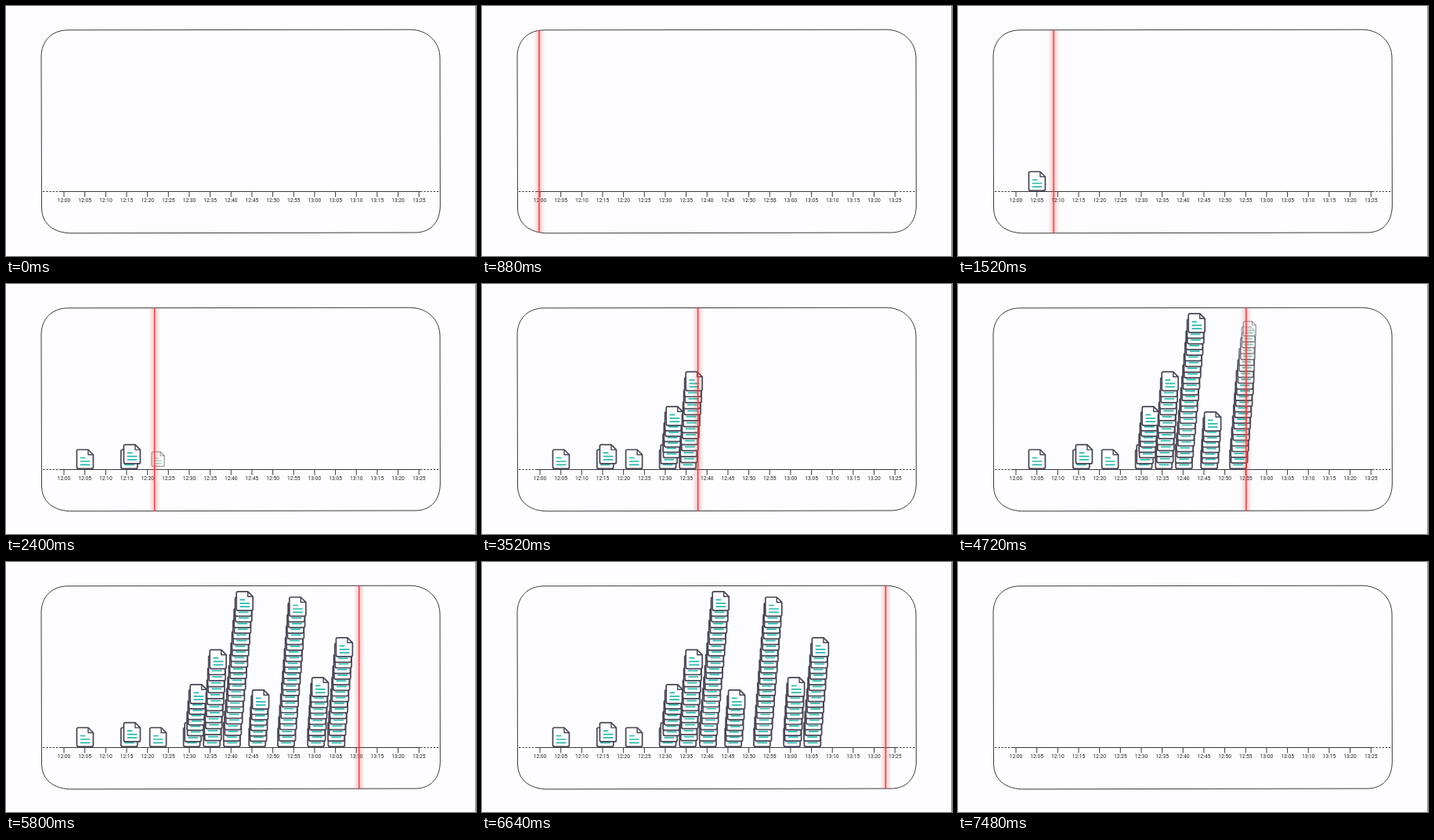
An HTML page with a canvas that plays this animation: 600 px wide and 320 px high, repeating every 7.88 s.

```html
<!DOCTYPE html>
<html lang="en">
<head>
<meta charset="utf-8">
<title>Documents over time</title>
<style>
  html, body { margin: 0; width: 600px; height: 320px; overflow: hidden; background: #fdfcfe; }
  svg, canvas { position: absolute; left: 0; top: 0; display: block; }
  text { font: 6.7px Roboto, Arial, sans-serif; text-anchor: middle; fill: #222; }
</style>
</head>
<body>
<svg width="600" height="320" viewBox="0 0 600 320" fill="none" stroke="#3a3a3e">
  <path id="frame"/>
  <path d="M68 237.5H529"/>
  <path d="M47 237.5H68M529 237.5H554" stroke-dasharray="2.4 1.8"/>
  <path d="M599.5 0V320" stroke="#85858a"/>
  <g id="ticks"></g>
</svg>
<canvas id="stage" width="600" height="320"></canvas>
<script>
const LOOP = 7880, STEP = 40;
const SWEEP_START = 520, SPEED = 0.0768, LEFT = 45.3;
const POP = 150, FADE_START = 7180, FADE_END = 7480;
const BASE = 212, GAP = 7.4, DOC_W = 21, DOC_H = 24.3;

const FRAME = 'M79 30.8L515 30.2C538 30 554 46 554 67L554.3 255' +
  'C554.3 277 542 290 522 290L85 290.8C61 291 45.5 279 45.5 258L45 65C45 45 58 31 79 30.8Z';
const framePath = new Path2D(FRAME);
document.getElementById('frame').setAttribute('d', FRAME);

const NS = 'http://www.w3.org/2000/svg';
const ticks = document.getElementById('ticks');
function add(tag, attrs, label) {
  const el = document.createElementNS(NS, tag);
  for (const key in attrs) el.setAttribute(key, attrs[key]);
  if (label) el.textContent = label;
  ticks.appendChild(el);
}
for (let i = 0; i < 18; i++) {
  const x = 74 + i * 26.66;
  const minutes = i * 5;
  const label = (12 + Math.floor(minutes / 60)) + ':' + String(minutes % 60).padStart(2, '0');
  add('path', { d: `M${x} 237.5V244.5` });
  add('text', { x, y: 250.9, stroke: 'none' }, label);
}

// Each pile: bottom x, top x, top y, optional bottom y
const piles = [
  [90.4, 90.4, BASE],
  [147.8, 150.4, 205.6],
  [183.6, 183.6, BASE],
  [227.6, 228.2, 205.6],
  [231.5, 235.2, 156.8, 198],
  [253.2, 260.2, 112.3],
  [278, 294.2, 37.8],
  [311.2, 314.6, 163.8],
  [348, 361.8, 45],
  [386.2, 390.6, 147.8],
  [411.4, 421.4, 96.8]
];

const docs = piles.flatMap(([x0, x1, top, bottom = BASE]) => {
  const last = Math.round((bottom - top) / GAP);
  return Array.from({ length: last + 1 }, (_, i) => {
    const k = last ? i / last : 0;
    const x = x0 + (x1 - x0) * k;
    return {
      x: x - (last - i) % 2,
      y: bottom + (top - bottom) * k,
      start: SWEEP_START + (x - LEFT) / SPEED
    };
  });
});

const outline = new Path2D(
  'M2 0H14.5L21 6.5V22.3Q21 24.3 19 24.3H2Q0 24.3 0 22.3V2Q0 0 2 0Z');
const fold = new Path2D('M14.5 0V6.5H21');
const lines = new Path2D('M4.3 10.5H11M4.3 15H17M4.3 19.3H17');

const ctx = document.getElementById('stage').getContext('2d');
const layer = document.createElement('canvas');
layer.width = 600;
layer.height = 320;
const pen = layer.getContext('2d');

function drawDoc(doc, t) {
  const p = Math.min(1, (t - doc.start) / POP);
  if (p <= 0) return;
  const s = 0.5 + 0.5 * p;
  pen.save();
  pen.globalAlpha = p;
  pen.translate(doc.x + DOC_W / 2, doc.y + DOC_H / 2);
  pen.scale(s, s);
  pen.translate(-DOC_W / 2, -DOC_H / 2);
  pen.lineJoin = 'round';
  pen.fillStyle = '#fdfdfe';
  pen.fill(outline);
  pen.strokeStyle = '#464655';
  pen.lineWidth = 1.7;
  pen.stroke(outline);
  pen.lineWidth = 1.4;
  pen.stroke(fold);
  pen.strokeStyle = '#2bb9ad';
  pen.lineWidth = 1.7;
  pen.stroke(lines);
  pen.restore();
}

function drawSweep(t) {
  const x = LEFT + (t - SWEEP_START) * SPEED;
  if (t < SWEEP_START || x > 562) return;
  const glow = ctx.createLinearGradient(x - 7.5, 0, x + 7.5, 0);
  glow.addColorStop(0, 'rgba(240,70,70,0)');
  glow.addColorStop(0.3, 'rgba(240,70,70,0.16)');
  glow.addColorStop(0.5, 'rgba(240,70,70,0.42)');
  glow.addColorStop(0.7, 'rgba(240,70,70,0.16)');
  glow.addColorStop(1, 'rgba(240,70,70,0)');
  ctx.save();
  ctx.clip(framePath);
  ctx.fillStyle = glow;
  ctx.fillRect(x - 7.5, 30, 15, 262);
  ctx.fillStyle = '#d93a3a';
  ctx.fillRect(x - 0.6, 30, 1.2, 262);
  ctx.restore();
}

function render(now) {
  const t = Math.floor((now % LOOP) / STEP) * STEP;
  const fade = Math.max(0, Math.min(1, (FADE_END - t) / (FADE_END - FADE_START)));
  ctx.clearRect(0, 0, 600, 320);
  pen.clearRect(0, 0, 600, 320);
  for (const doc of docs) drawDoc(doc, t);
  ctx.globalAlpha = fade;
  ctx.drawImage(layer, 0, 0);
  ctx.globalAlpha = 1;
  drawSweep(t);
}

let origin;
function tick(now) {
  if (origin === undefined) origin = now;
  render(now - origin);
  requestAnimationFrame(tick);
}
render(0);
requestAnimationFrame(tick);
</script>
</body>
</html>
```
